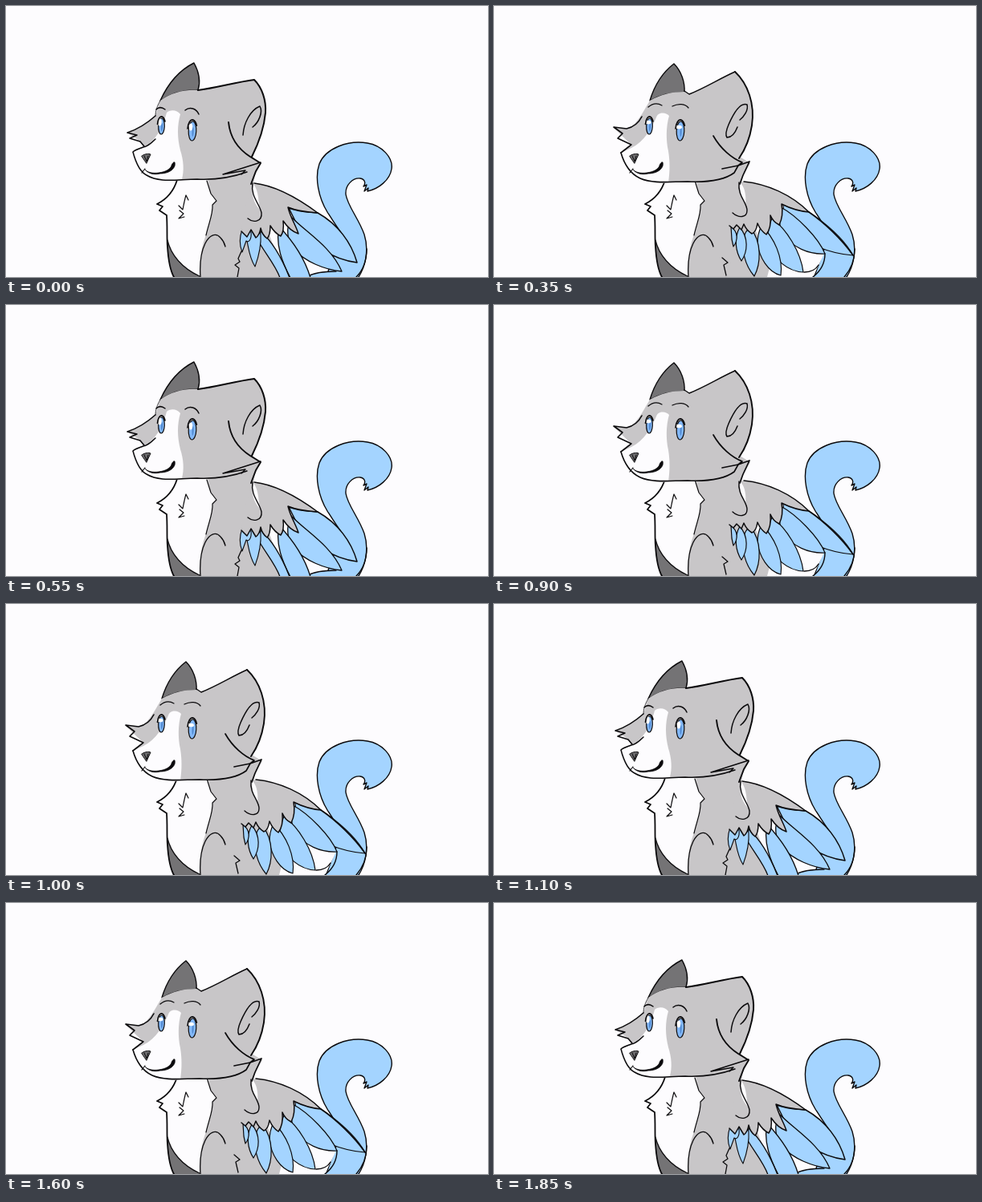
Recreate the animation shown at these times as an HTML page with a canvas. Size 600x338 px, loop 1900 ms.

```html
<!DOCTYPE html>
<html lang="en">
<head>
<meta charset="utf-8">
<title>Winged cat</title>
<style>
html, body { margin: 0; width: 100%; height: 100%; overflow: hidden; background: #fdfcfe; }
canvas { display: block; width: 600px; height: 338px; }
</style>
</head>
<body>
<canvas id="stage" width="600" height="338"></canvas>
<script>
const ctx = document.getElementById('stage').getContext('2d');
const LOOP = 1900, STEP = 50, HOLD = 290, LEAD = 75;
const PAPER = '#fdfcfe', GREY = '#c8c6c8', DARK = '#747375', BLUE = '#a4d4ff', IRIS = '#82b7f6', INK = '#0b0a0c';

// A part is a path, a fill (or null) and a line width (0 for none).
const part = (d, fill, width = 0) => ({ path: new Path2D(d), fill, width });
const line = (d, width = 1.5) => part(d, null, width);
const fill = (d, color) => part(d, color);

const tail = [
  part('M436 342C448 327 452 304 446 285C439 265 425 249 423 235C422 223 432 214 441 215C447 216 448 221 445 225L449 223L446 231L451 227L450 231C464 228 478 217 480 203C482 189 468 174 450 171C426 167 398 177 390 197C384 214 389 239 400 257C407 268 412 276 418 284L397 342', BLUE, 1.4)
];

const body = [
  fill('M213 215C208 230 200 240 188 247L195 250L191 255L200 261C201 277 200 290 201 302L204 338H246L268 230L254 213Z', PAPER),
  fill('M250 212L255 234L262 243L257 248C258 259 251 275 248 288C242 305 241 322 241 339H348L322 270L308 222L312 200Z', GREY),
  fill('M201 292C205 310 219 327 241 337V338H208C203 326 200 306 201 292Z', DARK),
  line('M213 217C209 230 200 241 188 247L195 250L191 255L200 261C201 277 200 288 201 300C202 317 204 329 209 338', 1.8),
  line('M201 292C205 310 219 327 241 337', 1.2),
  line('M250 218L255 234L262 243L257 248C258 259 252 272 249 286', 1.2),
  line('M242 338C241 322 243 306 248 296C253 286 261 282 267 289C270 292 272 296 273 300', 1.3),
  line('M227 242L224 236C222 243 221 249 220 254L215 249M216 255L221 259L215 265L222 263', 1.2)
];

const nose = [
  fill('M169 187C173 184 178 184 180 185L175 196Z', '#6b6a6c'),
  line('M169 187C173 184 178 184 180 185L175 196ZM172 187L175 194L177 187', 1),
  line('M173 203L169 208', 1.2),
  part('M173 204C176 208 184 209 190 208C199 207 205 203 206 199C207 196 209 194 210 195C212 202 204 209 192 209C184 211 177 209 173 204Z', INK, 0.8)
];

const wingDown = [
  fill('M352 318L360 338H374L400 328Z', PAPER),
  fill('M411 324L442 308C449 318 443 329 436 338H374C384 333 396 331 411 331Z', BLUE),
  line('M449 303C449 319 443 331 436 338M374 338C384 332 396 331 411 331', 1.4),
  part('M352 252C365 257 378 257 388 258C413 272 430 295 437 320C407 316 375 297 360 268Z', BLUE, 1.5),
  part('M355 263C373 282 405 300 418 331C397 329 372 319 358 303C350 293 348 277 355 263Z', BLUE, 1.3),
  part('M340 275C356 292 371 312 379 339H354C344 320 335 298 340 275Z', BLUE, 1.3),
  part('M317 281C332 294 344 316 353 339H341C336 324 323 309 314 293Z', BLUE, 1.3),
  part('M303 280L317 284C318 299 314 314 310 325C303 314 302 302 300 293Z', BLUE, 1.1),
  part('M294 279L305 282C306 291 302 296 299 293L294 307C290 297 291 287 294 279Z', BLUE, 1.1),
  fill('M309 221C336 224 365 241 388 258C376 257 363 256 351 251C354 264 361 274 364 284C355 281 349 274 345 268C346 277 345 283 342 287C336 284 332 279 329 274C329 281 328 287 325 290C321 287 318 282 317 277C316 283 314 287 311 289L305 279L300 288L293 281C294 260 300 240 309 221Z', GREY),
  line('M309 221C336 224 365 241 388 258C376 257 363 256 351 251C354 264 361 274 364 284C355 281 349 274 345 268C346 277 345 283 342 287C336 284 332 279 329 274C329 281 328 287 325 290C321 287 318 282 317 277C316 283 314 287 311 289L305 279L300 288L293 281'),
  fill('M308 222C315 231 314 244 316 254C308 246 305 234 308 222Z', PAPER),
  line('M307 221C304 237 316 247 318 258C319 269 308 271 301 265', 1.4),
  line('M293 306L289 315L291 319L285 323L290 327L288 338', 1.3)
];

const wingUp = [
  fill('M350 338H397L411 309L382 304Z', PAPER),
  fill('M340 338L382 338L385 332L350 300Z', PAPER),
  fill('M322 338L301 288L286 318L289 338Z', GREY),
  fill('M410 309L447 310C447 321 443 330 436 338H396C407 330 411 320 410 309Z', BLUE),
  line('M449 303C449 320 443 330 436 338M412 309C412 322 406 331 397 338M386 332C395 332 401 328 404 323', 1.4),
  part('M360 248C374 249 390 254 402 264C421 278 438 295 447 311C419 309 389 298 371 278C363 269 360 258 360 248Z', BLUE, 1.2),
  part('M357 251C376 261 404 289 412 309C391 310 372 301 360 285C354 274 354 263 357 251Z', BLUE, 1.2),
  part('M346 265C364 278 382 307 385 332C365 331 349 316 342 298C339 285 341 275 346 265Z', BLUE, 1.2),
  part('M333 274C349 289 360 314 357 336C341 332 330 313 328 296C328 286 330 280 333 274Z', BLUE, 1.2),
  part('M319 277C334 294 332 322 324 337C312 323 308 304 311 289C312 283 315 279 319 277Z', BLUE, 1.2),
  part('M306 276C317 289 316 306 308 318C301 307 298 290 306 276Z', BLUE, 1.2),
  part('M295 275C304 282 304 292 298 300L296 291Z', BLUE, 1.2),
  fill('M307 219C337 222 369 235 392 257C380 256 368 252 358 247C360 258 358 267 355 273C349 270 346 266 344 261C345 272 343 280 339 285C333 281 330 276 328 271C327 278 324 283 321 284C316 281 313 277 311 272L308 279L302 273L298 278L293 274C295 253 300 241 307 219Z', GREY),
  line('M311 219C340 222 370 235 392 257C380 256 368 252 358 247C360 258 358 267 355 273C349 270 346 266 344 261C345 272 343 280 339 285C333 281 330 276 328 271C327 278 324 283 321 284C316 281 313 277 311 272L308 279L302 273L298 278L293 274'),
  line('M392 257C411 270 433 291 447 311', 1.6),
  fill('M307 221C313 227 314 239 313 248C307 240 305 230 307 221Z', PAPER),
  line('M305 220C303 237 315 245 315 255C315 264 305 265 297 258', 1.4),
  line('M284 314L291 320L286 323L289 336', 1.3)
];

const headLow = [
  part('M192 118C202 96 216 80 234 71C239 80 243 92 239 105C222 104 206 109 192 118Z', DARK, 1.4),
  fill('M192 118C206 108 222 104 239 105L309 92C319 102 324 118 323 133C320 154 312 174 306 187L317 196L306 220L300 207C278 217 250 215 222 217C204 219 188 219 177 211C166 201 162 191 159 181L171 175L166 168L151 158C167 152 176 145 186 137Z', GREY),
  fill('M200 133C204 129 213 129 217 135C213 149 213 164 217 180C221 192 222 205 219 216C203 219 187 218 175 210C165 200 161 191 158 182L171 176C186 169 195 152 200 133Z', PAPER),
  line('M239 105C262 102 286 95 309 92C319 102 324 118 323 133C321 156 313 174 306 188', 2),
  line('M277 145C279 165 290 179 304 188L317 196L311 206L305 222', 1.9),
  line('M317 195L270 210L298 205L293 210', 1.4),
  line('M192 118C188 125 186 131 186 137', 0.8),
  line('M186 137C176 146 166 153 151 158L163 161L154 165L167 169L172 175', 1.6),
  line('M186 166C179 173 173 176 171 176C165 178 160 180 158 182C162 197 167 207 175 211C191 221 213 216 238 216C261 217 281 214 300 207', 1.5),
  line('M295 161C296 146 304 130 316 125C320 132 315 145 307 151', 1.5),
  line('M187 129C190 126 194 126 198 129M223 130C229 125 237 128 240 135', 1.5)
];

const headHigh = [
  part('M194 118C200 98 211 82 224 72C233 81 238 95 237 108C222 107 207 111 194 118Z', DARK, 1.4),
  fill('M194 118C208 110 222 107 237 107L243 110C263 102 280 91 300 82C316 97 325 122 321 149C317 168 312 180 306 188L319 196L306 220L299 208C281 221 250 218 222 220C204 222 185 221 173 209C165 200 161 191 158 183L172 174L149 152L166 153C175 149 180 141 184 135Z', GREY),
  fill('M202 139C204 132 214 132 218 137C214 151 214 167 217 181C219 194 219 206 217 220C202 222 184 220 173 209C165 200 161 191 158 183L171 177C187 169 196 153 202 139Z', PAPER),
  line('M237 106L243 110C263 102 280 91 300 82', 1.4),
  line('M300 82C316 97 325 122 321 149C318 168 312 180 305 190', 1.9),
  line('M273 162C282 178 296 190 309 195L304 199L318 194L310 211L306 222M284 203L304 199', 1.7),
  line('M184 138C180 146 174 151 165 153L149 151L160 159L154 165L171 173L158 183', 1.6),
  line('M158 183C162 197 169 209 182 215C198 222 220 219 241 219C264 220 287 217 299 208L304 199', 1.6),
  line('M315 123C307 120 299 132 292 148C289 155 288 161 290 164C296 164 300 159 303 151M315 123C317 130 311 138 306 142', 1.5),
  line('M192 126C198 121 204 121 209 124M222 125C230 121 238 122 242 127', 1.3)
];

const poses = [
  { parts: [...tail, ...body, ...wingDown, ...headLow, ...nose], glint: [2.2, 4.5] },
  { parts: [...tail, ...body, ...wingUp, ...headHigh, ...nose], glint: [4, 2.2] }
];

function draw({ path, fill: color, width }) {
  if (color) {
    ctx.fillStyle = color;
    ctx.fill(path);
  }
  if (width) {
    ctx.lineWidth = width;
    ctx.stroke(path);
  }
}

function oval(x, y, rx, ry, color, width) {
  ctx.beginPath();
  ctx.ellipse(x, y, rx, ry, 0.04, 0, Math.PI * 2);
  ctx.fillStyle = color;
  ctx.fill();
  if (width) {
    ctx.lineWidth = width;
    ctx.stroke();
  }
}

function eye(x, y, rx, ry, glint) {
  oval(x, y, rx, ry, IRIS, 1.2);
  oval(x + 0.6, y + 1, 0.9, ry * 0.5, '#4d86cf', 0);
  oval(x - 2, y - 5, ...glint, '#fff', 0);
  ctx.beginPath();
  ctx.ellipse(x, y - 1, rx + 1.2, ry + 1, 0, Math.PI * 1.05, Math.PI * 1.85);
  ctx.lineWidth = 1.7;
  ctx.stroke();
}

function render(now) {
  const t = Math.floor(now % LOOP / STEP) * STEP;
  const pose = poses[Math.floor((t + LEAD) / HOLD) % 2];
  ctx.fillStyle = PAPER;
  ctx.fillRect(0, 0, 600, 338);
  ctx.strokeStyle = INK;
  ctx.lineCap = ctx.lineJoin = 'round';
  pose.parts.forEach(draw);
  eye(193.5, 150, 3.8, 10, pose.glint);
  eye(232, 156, 4.8, 12, pose.glint);
}

const start = performance.now();
function tick() {
  render(performance.now() - start);
  requestAnimationFrame(tick);
}
tick();
</script>
</body>
</html>
```
